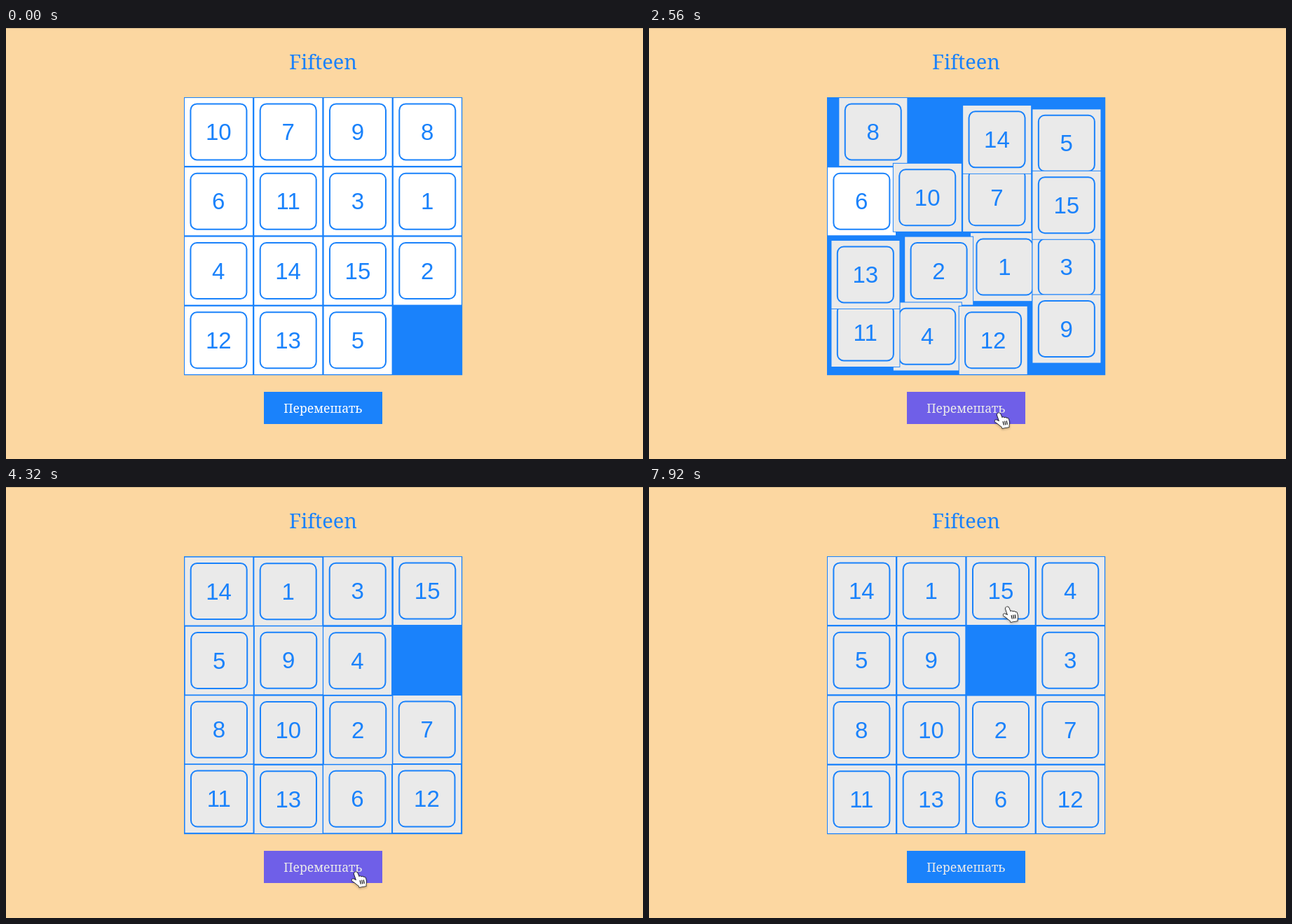
An HTML page with a canvas that plays this animation: 909x616 px, repeating every 8 s.

```html
<!DOCTYPE html>
<html lang="ru">
<head>
<meta charset="utf-8">
<title>Fifteen</title>
<style>
  html, body { margin: 0; width: 100%; height: 100%; overflow: hidden; background: #fcd7a1; }
  canvas { display: block; }
</style>
</head>
<body>
<canvas id="stage" width="909" height="616"></canvas>
<script>
const ctx = document.getElementById('stage').getContext('2d');
const LOOP = 8000, TICK = 80, SLIDE = 500;
const LEFT = 254, TOP = 99, CELL = 99.3;
const BLUE = '#1a82fb', PURPLE = '#6f5fe8', SAND = '#fcd7a1', GREY = '#eaeaea';
const BUTTON = { x: 368, y: 520, w: 169, h: 46 };

// Layouts as hex digits, row by row; 0 is the gap.
const steps = [
  { at: 0, grid: 'A7986B314EF2CD50' },
  { at: 2205, grid: '80E56A7FD213B4C9' },
  { at: 3028, grid: 'C7BF63890EA541D2' },
  { at: 3855, grid: 'E13F59408A27BD6C' }
];
function slide(at, tile) {
  const swap = { [tile]: '0', 0: tile };
  const last = steps[steps.length - 1].grid;
  steps.push({ at, grid: [...last].map(c => swap[c] || c).join('') });
}
slide(5160, '4');
slide(5757, '3');
slide(6320, 'F');
slide(6860, '4');
slide(7390, '3');

// Pointer stops: time, x, y
const path = [
  [1120, 512, 622], [1280, 507, 577], [1440, 501, 558], [1600, 497, 550],
  [4440, 497, 550], [4960, 506, 240], [5240, 505, 238], [5660, 502, 182],
  [5880, 502, 182], [6240, 598, 152], [6400, 600, 152], [6740, 600, 238],
  [6920, 600, 238], [7280, 512, 242], [7480, 511, 242], [7840, 509, 171]
];

const mix = (a, b, p) => a + (b - a) * p;
const smooth = p => p * p * (3 - 2 * p);

// cubic-bezier(.25, .1, .25, 1)
function ease(x) {
  if (x >= 1) return 1;
  let lo = 0, hi = 1;
  for (let i = 0; i < 24; i++) {
    const s = (lo + hi) / 2, r = 1 - s;
    if (0.75 * s * r + s * s * s < x) lo = s; else hi = s;
  }
  const r = 1 - lo;
  return 0.3 * lo * r * r + 3 * lo * lo * r + lo ** 3;
}

function pointerAt(t) {
  if (t < path[0][0]) return null;
  const i = path.findIndex(p => p[0] > t);
  if (i < 0) return { x: path[path.length - 1][1], y: path[path.length - 1][2] };
  const [t0, x0, y0] = path[i - 1], [t1, x1, y1] = path[i];
  const p = smooth((t - t0) / (t1 - t0));
  return { x: mix(x0, x1, p), y: mix(y0, y1, p) };
}

const inside = (p, r) => p && p.x >= r.x && p.x < r.x + r.w && p.y >= r.y && p.y < r.y + r.h;

function text(str, x, y, font, color) {
  ctx.font = font;
  ctx.fillStyle = color;
  ctx.textAlign = 'center';
  ctx.fillText(str, x, y);
}

function drawTile(n, x, y, fill) {
  ctx.fillStyle = BLUE;
  ctx.fillRect(x, y, CELL - 0.4, CELL - 0.4);
  ctx.fillStyle = fill;
  ctx.fillRect(x + 1, y + 1, CELL - 2.3, CELL - 2.3);
  ctx.strokeStyle = BLUE;
  ctx.lineWidth = 2;
  ctx.beginPath();
  ctx.roundRect(x + 9.4, y + 9.4, 80, 80, 9);
  ctx.stroke();
  text(n, x + 49.3, y + 61, '33px "Liberation Sans", Arial, sans-serif', BLUE);
}

function drawTiles(t) {
  let k = 0;
  while (k + 1 < steps.length && steps[k + 1].at <= t) k++;
  const to = steps[k].grid, from = steps[Math.max(0, k - 1)].grid;
  const p = k ? ease((t - steps[k].at) / SLIDE) : 1;
  for (let n = 1; n < 16; n++) {
    const id = n.toString(16).toUpperCase();
    const a = from.indexOf(id), b = to.indexOf(id);
    const home = steps[0].grid.indexOf(id);
    const moved = steps.slice(1, k + 1).some(s => s.grid[home] !== id);
    drawTile(n, LEFT + CELL * mix(a % 4, b % 4, p),
      TOP + CELL * mix(a >> 2, b >> 2, p), moved ? GREY : '#fff');
  }
}

const arrow = new Path2D('M0 0V17.5L4 13.8L7 20.6L10 19.3L7.1 12.6H12.6Z');
const hand = new Path2D('M1.2 0.6C2.6 -0.3 4 0.6 4.6 2L6.8 7.2C7.6 6 9.4 6 10.2 7.4' +
  'C11.2 6.4 12.8 6.6 13.4 8C14.6 7.4 15.8 8 16.2 9.4L17 13C17.4 15 16.8 16.6 16.6 18.2' +
  'L16.8 20.2L7.2 22L6.4 20C4.4 18.4 1 15.6 -2.6 13.2C-4.4 11.6 -2.8 9.8 -0.8 10.4' +
  'L3 12.2L0 3.6C-0.4 2.2 0 1.2 1.2 0.6Z');
const creases = new Path2D('M8.2 12.6L9.2 17.2M10.8 12.2L11.7 16.8M13.3 11.8L14.1 16.3');

function drawPointer(p, isHand) {
  ctx.save();
  ctx.translate(p.x, p.y);
  ctx.lineJoin = ctx.lineCap = 'round';
  ctx.shadowColor = 'rgba(0,0,0,.35)';
  ctx.shadowBlur = 3;
  ctx.shadowOffsetY = 1.5;
  ctx.lineWidth = isHand ? 1.5 : 2.4;
  ctx.strokeStyle = isHand ? '#111' : '#fff';
  ctx.fillStyle = isHand ? '#fff' : '#000';
  const shape = isHand ? hand : arrow;
  ctx.stroke(shape);
  ctx.shadowColor = 'transparent';
  ctx.fill(shape);
  if (isHand) {
    ctx.lineWidth = 1.2;
    ctx.stroke(creases);
  }
  ctx.restore();
}

function draw(t) {
  const pointer = pointerAt(t);
  const hover = inside(pointer, BUTTON);
  const board = { x: LEFT, y: TOP, w: CELL * 4, h: CELL * 4 };

  ctx.fillStyle = SAND;
  ctx.fillRect(0, 0, 909, 616);
  ctx.fillStyle = '#d3b78c';
  ctx.fillRect(0, 0, 909, 1);
  text('Fifteen', 452.5, 59, '29px "Noto Serif", serif', BLUE);

  ctx.fillStyle = BLUE;
  ctx.fillRect(board.x, board.y, board.w, board.h);
  drawTiles(t);

  ctx.fillStyle = hover ? PURPLE : BLUE;
  ctx.fillRect(BUTTON.x, BUTTON.y, BUTTON.w, BUTTON.h);
  text('Перемешать', 452.5, 549.5, '17.6px "Noto Serif", serif', t < 1440 ? '#fff' : GREY);

  if (pointer) drawPointer(pointer, hover || inside(pointer, board));
}

const start = performance.now();
function loop() {
  const t = (performance.now() - start) % LOOP;
  draw(Math.floor(t / TICK) * TICK);
  requestAnimationFrame(loop);
}
loop();
</script>
</body>
</html>
```
